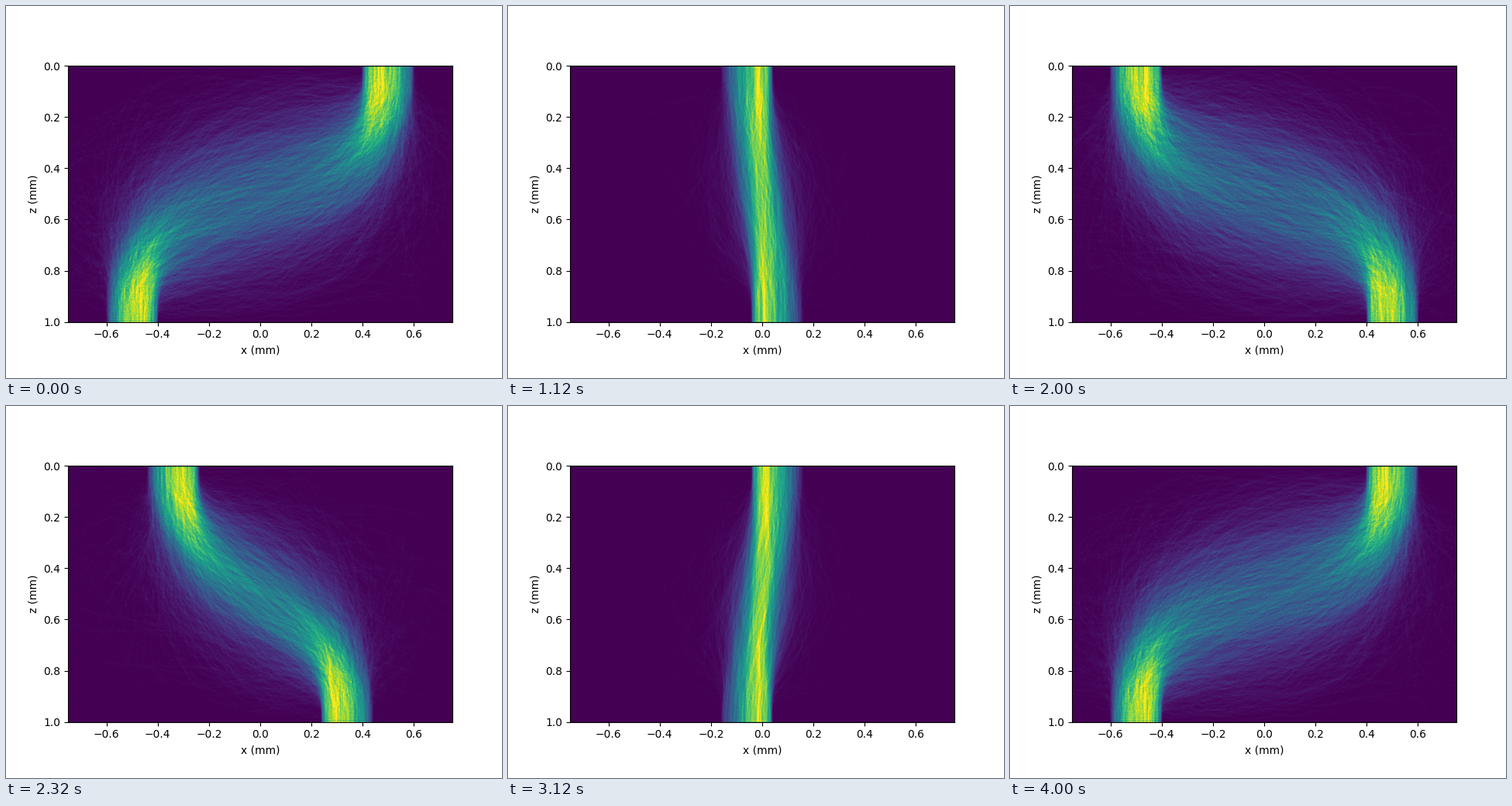
A matplotlib script that plays this animation: 640x480 px, repeating every 4080 ms.

```python
import numpy as np
import matplotlib.pyplot as plt
from matplotlib.animation import FuncAnimation

STEPS = 26            # source positions in one sweep
FRAMES = 2 * STEPS - 1
W, H = 496, 330       # density grid
PATHS, POINTS, MODES = 4200, 440, 14
RADIUS = 0.1          # aperture radius in mm

t = np.linspace(0, 1, POINTS, dtype=np.float32)
k = np.arange(1, MODES + 1, dtype=np.float32)[:, None]
wobble = np.sin(np.pi * t) * np.sin(k * np.pi * t) / k ** 1.8
wobble = wobble.astype(np.float32)
cubic = t * t * (3 - 2 * t)
quintic = t ** 3 * (10 - 15 * t + 6 * t * t)


def disc(rng, n):
    """Positions across a uniformly lit round aperture."""
    return RADIUS * np.sqrt(rng.random(n)) * np.cos(2 * np.pi * rng.random(n))


def column(a):
    return a.astype(np.float32)[:, None]


def photon_paths(xs, rng):
    """Scattered paths from (xs, 0) to (-xs, 1), vertical at both ends."""
    start, end = xs + disc(rng, 30000), -xs + disc(rng, 30000)
    likely = np.exp(-np.abs(start - end) / (0.08 + 0.5 * abs(xs)))
    pick = rng.choice(len(start), PATHS, p=likely / likely.sum())
    start, shift = start[pick], (start - end)[pick]
    size = np.abs(shift)

    tail = rng.gamma(1.2, size=PATHS)
    amp = column((0.025 + 0.1 * size) * np.sqrt(1.2 / np.maximum(tail, 0.02)))
    noise = rng.standard_normal((2, PATHS, MODES), dtype=np.float32) * amp

    mix = column(np.minimum(size, 1))
    ease = cubic + mix * (quintic - cubic)
    x = column(start) - column(shift) * ease + noise[0] @ wobble

    mean, spread = 0.33 + 0.33 * size, 0.03 + 0.2 * size
    h1, h2 = (column(np.clip(rng.normal(mean, spread), 0.1, 1.1))
              for _ in range(2))
    z = (3 * t * (1 - t) ** 2 * h1 + 3 * t * t * (1 - t) * (1 - h2)
         + t ** 3 + noise[1] @ wobble)

    inside = (z.min(axis=1) > -1e-4) & (z.max(axis=1) < 1 + 1e-4)
    return x[inside], z[inside]


def soften(a):
    for axis in (0, 1):
        pad = np.pad(a, [(1, 1) if i == axis else (0, 0) for i in (0, 1)],
                     mode="edge")
        n = a.shape[axis]
        before = np.take(pad, range(n), axis)
        after = np.take(pad, range(2, n + 2), axis)
        a = 0.6 * a + 0.2 * (before + after)
    return a


def density(step):
    """Track length per cell, scaled to the brightest part of the beam."""
    x, z = photon_paths(0.5 - 0.04 * step, np.random.default_rng(100 + step))
    length = np.hypot(np.diff(x), np.diff(z))
    col = ((x[:, 1:] + x[:, :-1]) / 2 + 0.75) * (W / 1.5)
    row = np.clip((z[:, 1:] + z[:, :-1]) / 2 * H, 0, H - 1)
    seen = (col >= 0) & (col < W)
    cell = row[seen].astype(np.int32) * W + col[seen].astype(np.int32)
    total = np.bincount(cell, length[seen], minlength=W * H)
    total = soften(total[:W * H].reshape(H, W))
    return total / np.percentile(total, 99.9)


maps = [density(s) for s in range(STEPS)]

fig, ax = plt.subplots(figsize=(6.4, 4.8), dpi=100)
image = ax.imshow(maps[0], cmap="viridis", vmin=0, vmax=1,
                  extent=(-0.75, 0.75, 1, 0), interpolation="nearest")
ax.set_xlabel("x (mm)")
ax.set_ylabel("z (mm)")


def draw(i):
    last = STEPS - 1
    image.set_data(maps[last - abs(last - i)])
    return (image,)


anim = FuncAnimation(fig, draw, frames=FRAMES, interval=80, repeat=True)
plt.show()
```
